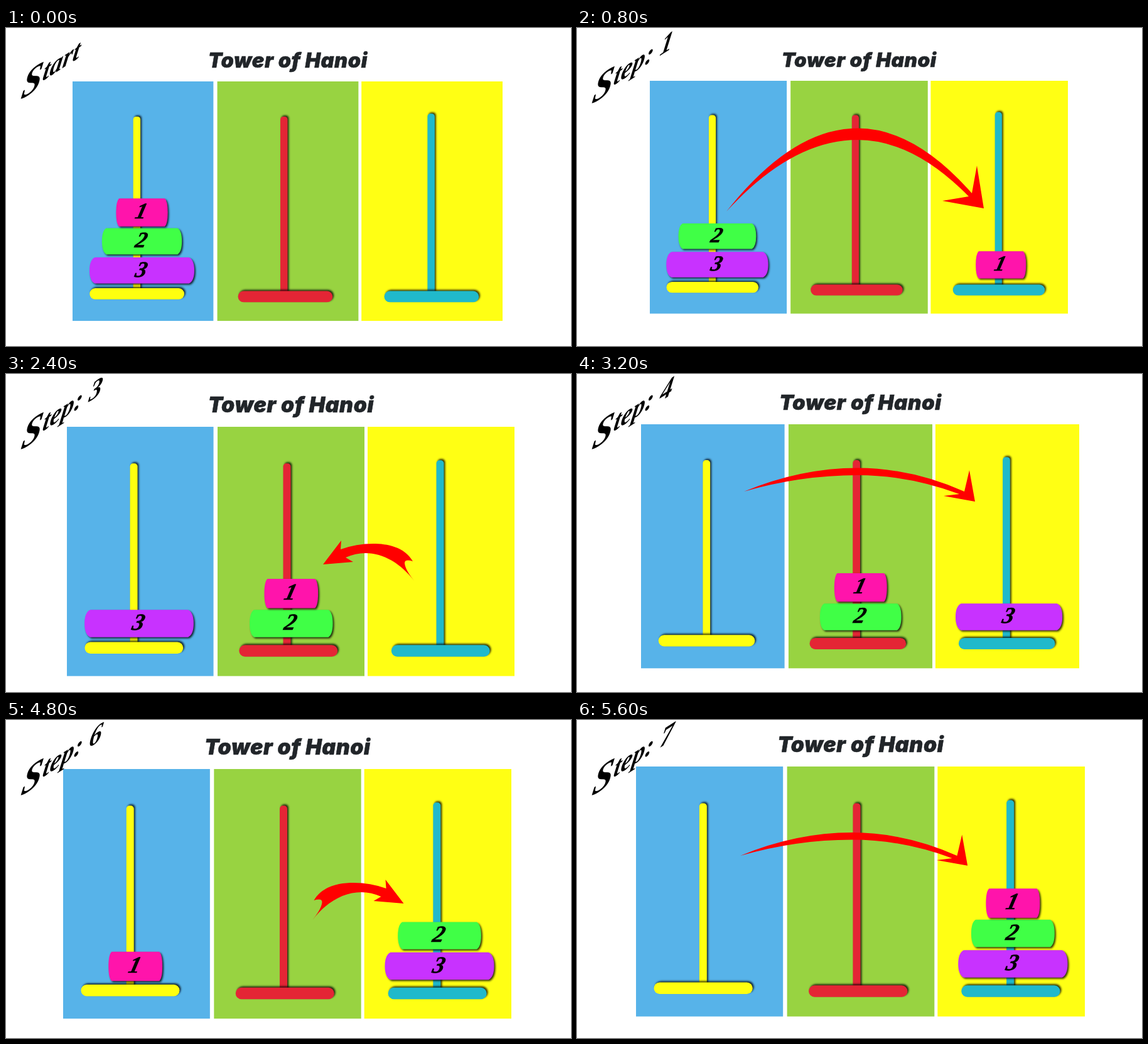
These frames come from a looping animation (900x506 px, 6400 ms). An HTML page:

```html
<!DOCTYPE html>
<html lang="en">
<head>
<meta charset="utf-8">
<title>Tower of Hanoi</title>
<style>
  html, body { margin: 0; width: 100%; height: 100%; overflow: hidden; background: #fff; }
  svg { display: block; width: 900px; height: 506px; }
  .title { font: italic 900 34px Inter, Roboto, sans-serif; letter-spacing: .6px; fill: #212529; stroke: #212529; stroke-width: .6px; text-anchor: middle; }
  .brush { font: italic bold 40px "Liberation Serif", serif; white-space: pre; }
  .label { letter-spacing: .4px; }
  .label .cap { font-size: 58px; }
  .num { font-size: 37px; text-anchor: middle; stroke: #000; stroke-width: .6px; }
  .peg { filter: drop-shadow(2px -2px 1.5px rgba(0, 0, 0, .8)); }
  .disk { filter: drop-shadow(2px 2px 1.5px rgba(0, 0, 0, .8)); }
  .arrow { fill: #f00; }
</style>
</head>
<body>
<svg id="stage" viewBox="0 0 900 506"></svg>
<script>
const STEP_MS = 800;
const BOARD_W = 716;

const towers = [
  { x: 0,   w: 234.5, bg: '#57b3e9', peg: '#ffff0f', pole: 101, top: 58.5, base: 28.5, floor: 344, mid: 115.5 },
  { x: 241, w: 235, bg: '#98d341', peg: '#e42535', pole: 346, top: 58.5, base: 275.5, floor: 348.7, mid: 358.8 },
  { x: 481, w: 235, bg: '#ffff14', peg: '#20b9cb', pole: 591, top: 53.5, base: 519, floor: 348.7, mid: 601.2 },
];

const disks = {
  1: { w: 86,  h: 46.5, lift: -1, color: '#ff14ab' },
  2: { w: 133, h: 43.5, lift: 0,  color: '#40ff46' },
  3: { w: 174.5, h: 43.5, lift: 0,  color: '#c832ff' },
};

// Two parabolas meeting at the crest, thin at the tail, with a barbed head.
function sweep([tx, ty], crest, outer, inner, [ox, oy], [ix, iy], head) {
  const mid = x => (x + crest) / 2;
  return `M${tx} ${ty}Q${mid(tx)} ${outer} ${crest} ${outer}Q${mid(ox)} ${outer} ${ox} ${oy}` +
    `L${head}L${ix} ${iy}Q${mid(ix)} ${inner} ${crest} ${inner}Q${mid(tx)} ${inner} ${tx} ${ty}Z`;
}

const highArc = sweep([238, 292], 447, 159.5, 178, [629, 263], [624, 268], '637 219 648 287 582 275');
const flatArc = sweep([266, 187], 447, 149.5, 161, [617, 187], [609, 191], '625 153 634 203 584 194');
const hop = 'M255 349C262 340 269 330 270 321Q270 314 257 318C270 295 298 290 320 290' +
  'Q347 290 372 299L371 285L400 323L352 319L364 312C325 294 283 312 255 349Z';

// Board left, top and width, label, stacks from left to right, arrow.
const steps = [
  { board: [106, 85, 685], label: 'Start',   stacks: ['321', '', ''] },
  { board: [116, 84, 666], label: 'Step: 1', stacks: ['32', '', '1'], arrow: [highArc] },
  { board: [95, 78, 716],  label: 'Step: 2', stacks: ['3', '2', '1'], arrow: [hop] },
  { board: [97, 84, 713],  label: 'Step: 3', stacks: ['3', '21', ''], arrow: [hop, 'translate(905 -20) scale(-1 1)'] },
  { board: [102, 80, 698], label: 'Step: 4', stacks: ['', '21', '3'], arrow: [flatArc] },
  { board: [95, 80, 710],  label: 'Step: 5', stacks: ['1', '2', '3'], arrow: [hop, 'translate(668 -20) scale(-1 1)'] },
  { board: [91, 78, 714],  label: 'Step: 6', stacks: ['1', '', '32'], arrow: [hop, 'translate(233.5 -31)'] },
  { board: [94, 74, 715],  label: 'Step: 7', stacks: ['', '', '321'], arrow: [flatArc, 'translate(-1.7 32) scale(.984)'] },
];

const rect = (x, y, w, h, fill, extra = '') =>
  `<rect x="${x}" y="${y}" width="${w}" height="${h}" fill="${fill}" ${extra}/>`;

function drawDisk(id, level, mid) {
  const { w, h, lift, color } = disks[id];
  const r = 1 + w * .045;
  const y = 292.6 + lift - level * 48.5;
  const shape = `M${r} 0H${w - r}Q${w} ${h * .1} ${w} ${h / 2}Q${w} ${h * .9} ${w - r} ${h}` +
    `H${r}Q0 ${h * .9} 0 ${h / 2}Q0 ${h * .1} ${r} 0Z`;
  return `<g transform="translate(${mid - w / 2} ${y})">
    <path class="disk" d="${shape}" fill="${color}"/>
    <text class="brush num" transform="translate(${w / 2 - 3.5} ${32 - lift}) skewX(-14)">${id}</text></g>`;
}

function drawTower(t, stack) {
  return rect(t.x, 0, t.w, 398.3, t.bg) +
    rect(t.pole, t.top, 12, t.floor - t.top + 8, t.peg, 'rx="5" class="peg"') +
    rect(t.base, t.floor, 157.5, 18.5, t.peg, 'rx="9.25" class="peg"') +
    [...stack].map((id, level) => drawDisk(id, level, t.mid)).join('');
}

function drawLabel(text) {
  const y = text === 'Start' ? 106 : 113;
  return `<text class="brush label" transform="translate(24 ${y}) skewY(-32.5) skewX(-12)">` +
    `<tspan class="cap" dy="8">${text[0]}</tspan><tspan dy="-8">${text.slice(1)}</tspan></text>`;
}

function drawStep({ board: [x, y, w], label, stacks, arrow }) {
  const [path, move = ''] = arrow || [];
  return `<g visibility="hidden">
    <g transform="translate(${x} ${y}) scale(${w / BOARD_W})">
      <text class="title" x="358.5" y="-23.5">Tower of Hanoi</text>
      ${towers.map((t, i) => drawTower(t, stacks[i])).join('')}
    </g>
    ${drawLabel(label)}
    ${path ? `<path class="arrow" d="${path}" transform="${move}"/>` : ''}
  </g>`;
}

const stage = document.getElementById('stage');
stage.innerHTML = steps.map(drawStep).join('');
const scenes = [...stage.children];
let shown = -1;

function tick() {
  const now = Math.floor(performance.now() / STEP_MS) % scenes.length;
  if (now !== shown) {
    scenes.forEach((g, i) => g.setAttribute('visibility', i === now ? 'visible' : 'hidden'));
    shown = now;
  }
  requestAnimationFrame(tick);
}
tick();
</script>
</body>
</html>
```
